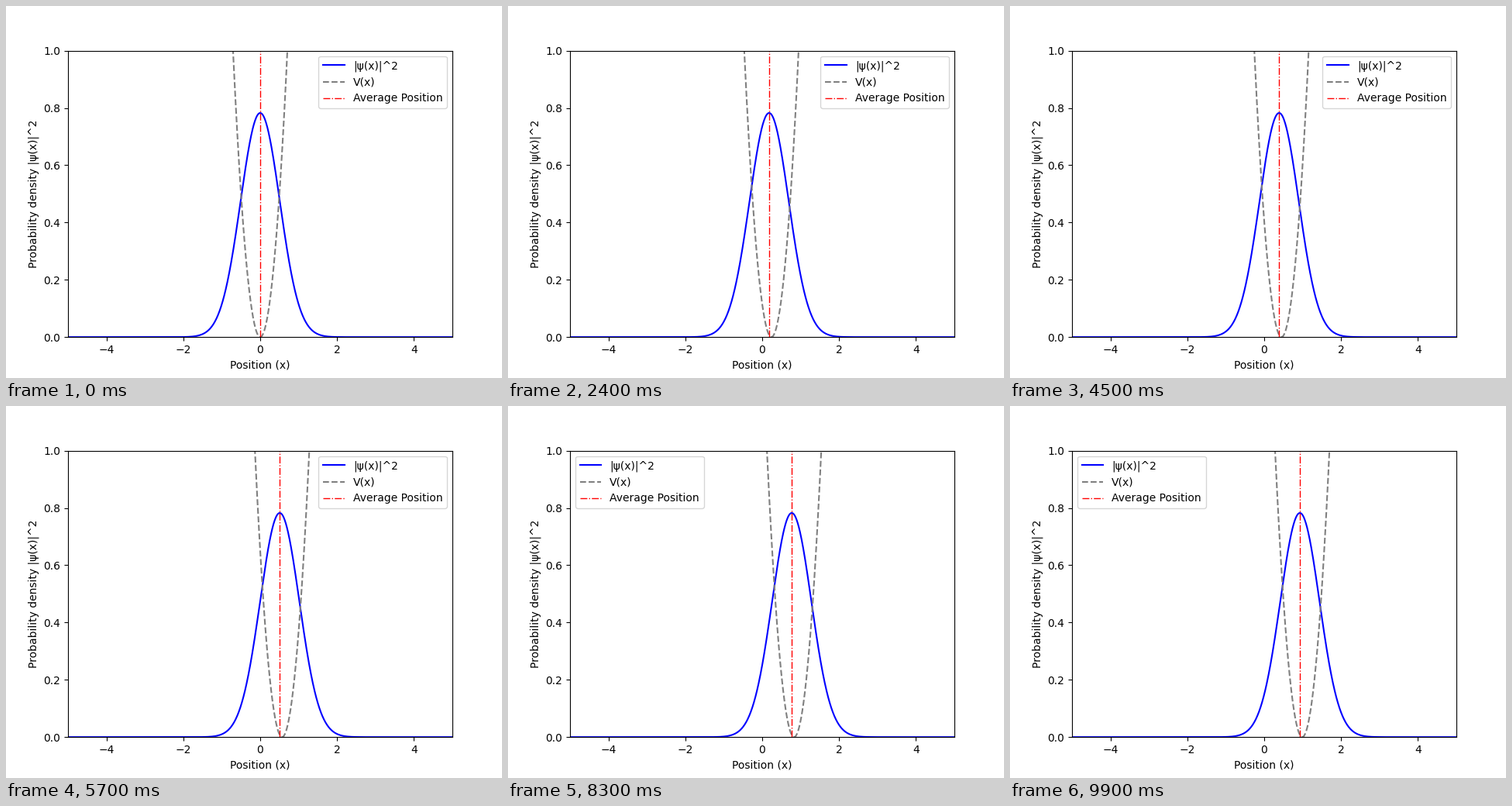
Animation of 640 by 480 pixels, one loop 10000 ms. Source, as a matplotlib script:

```python
import numpy as np
import matplotlib.pyplot as plt
from matplotlib.animation import FuncAnimation

FRAMES, INTERVAL = 100, 100
STEP = 0.01    # trap shift per frame
DECAY = 0.86   # share of the packet's offset left after each relaxation step
WIDTH = 1.9236  # Gaussian exponent of the probability density

x = np.linspace(-5, 5, 1000)


def trap_center(i):
    return STEP * i


def packet_center(i):
    """The packet relaxes towards the trap and trails it by a settling lag."""
    lag = STEP * DECAY / (1 - DECAY) * (1 - DECAY**i)
    return trap_center(i) - lag


def density(center):
    return np.sqrt(WIDTH / np.pi) * np.exp(-WIDTH * (x - center) ** 2)


def potential(center):
    return 2 * (x - center) ** 2


fig, ax = plt.subplots(figsize=(6.4, 4.8), dpi=100)
psi_line, = ax.plot(x, density(0), "b-", label="|ψ(x)|^2")
v_line, = ax.plot(x, potential(0), "--", color="gray", label="V(x)")
mean_line = ax.axvline(0, color="r", ls="-.", lw=1, label="Average Position")
ax.set(xlim=(-5, 5), ylim=(0, 1), xlabel="Position (x)",
       ylabel="Probability density |ψ(x)|^2")
ax.legend(loc="best")


def update(i):
    c = packet_center(i)
    psi_line.set_ydata(density(c))
    v_line.set_ydata(potential(trap_center(i)))
    mean_line.set_xdata([c, c])
    return psi_line, v_line, mean_line


anim = FuncAnimation(fig, update, frames=FRAMES, interval=INTERVAL,
                     init_func=lambda: update(0), repeat=True, repeat_delay=0)
plt.show()
```
